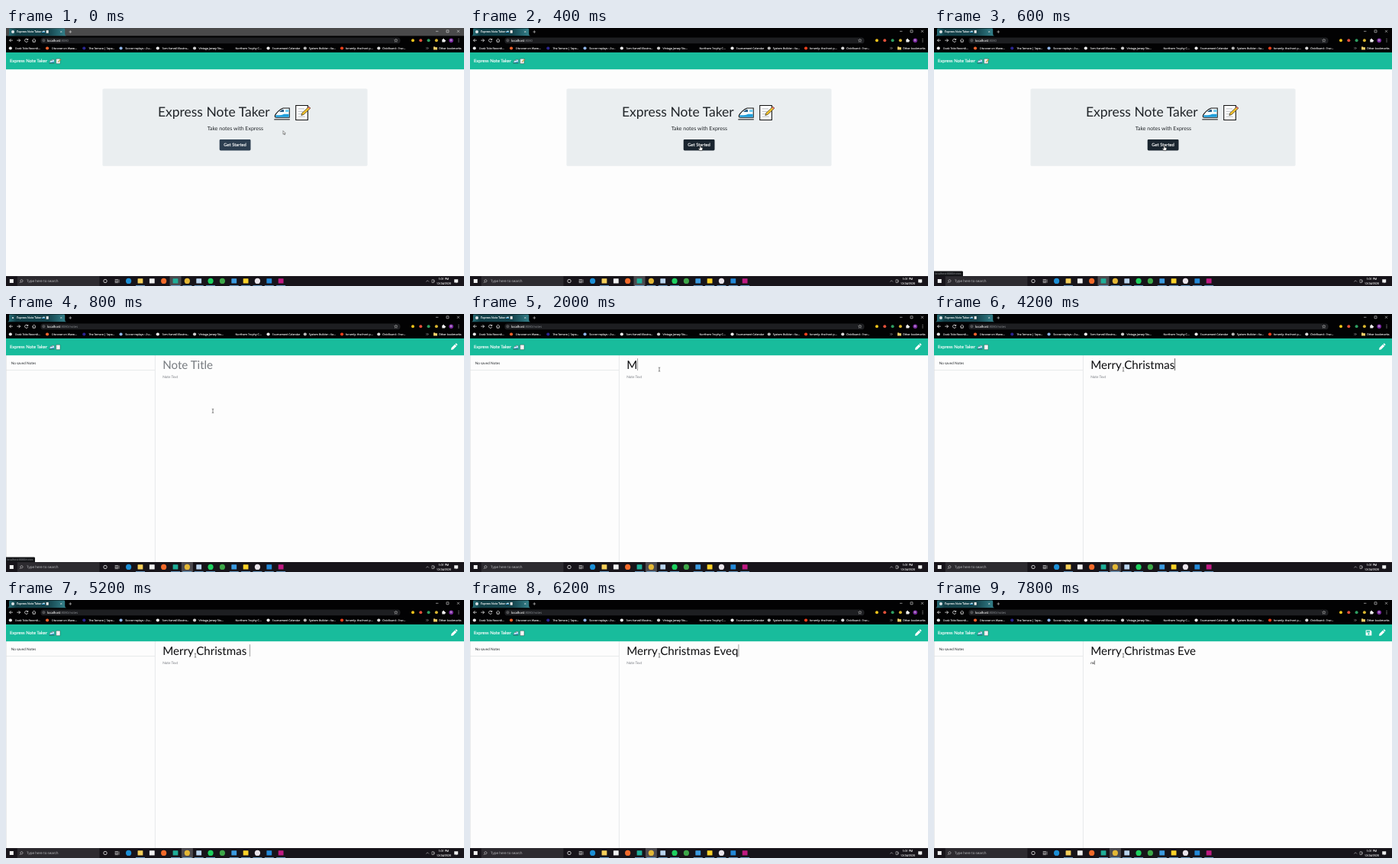
These frames come from a looping animation (600 by 338 pixels, 8000 ms). An HTML page:

```html
<!DOCTYPE html>
<html lang="en">
<head>
<meta charset="utf-8">
<title>Express Note Taker</title>
<style>
html, body { margin: 0; width: 100%; height: 100%; overflow: hidden; background: #fdfdfd; }
svg { display: block; width: 100vw; height: 100vh; }
text { font-family: Lato, sans-serif; white-space: pre; text-rendering: geometricPrecision; }
.ui text { font-family: "Open Sans", sans-serif; stroke: #fff; stroke-width: .1; }
.ui .dim { stroke: none; }
.light { fill: #fff; stroke: #fff; stroke-width: .14; }
</style>
</head>
<body>
<svg id="stage" viewBox="0 0 600 338" xmlns="http://www.w3.org/2000/svg">
  <defs>
    <linearGradient id="glow">
      <stop offset="0" stop-color="#2a7680"/>
      <stop offset=".15" stop-color="#123f47"/>
      <stop offset=".7" stop-color="#15454e"/>
      <stop offset="1" stop-color="#35838d"/>
    </linearGradient>
    <symbol id="train" viewBox="0 0 22 20" overflow="visible">
      <path d="M1 13.5C2.5 10 8 4.5 12.5 3.2H21V16H3Q.6 16 1 13.5Z" fill="#f6fbfd" stroke="#111" stroke-width="1.1"/>
      <path d="M1.6 12.8Q10 13.2 13.5 11.2H20.4V15.4H3Q1.4 15.3 1.6 12.8Z" fill="#1f9fdb"/>
      <path d="M7 8.4L10.8 5.2H13.4V8.4Z" fill="#2a5f86"/>
      <path d="M15.6 5.4H20.4V8.4H15.6Z" fill="#6cccf0"/>
      <path d="M0 18.8H21.6" stroke="#111" stroke-width="1.1"/>
    </symbol>
    <symbol id="page" viewBox="0 0 22 22" overflow="visible">
      <path d="M1.5 1.5H17.5V21H1.5Z" fill="#fff" stroke="#111" stroke-width="1.1"/>
      <path d="M4.5 6H13M4.5 9.5H11M4.5 13H9M4.5 16.5H14" stroke="#a4a9ad" stroke-width=".8"/>
    </symbol>
    <symbol id="memo" viewBox="0 0 22 22" overflow="visible">
      <use href="#page" width="22" height="22"/>
      <path d="M8.8 14.8L9.9 11.6L19 3L21.2 5.1L12 13.7Z" fill="#f7c52b" stroke="#222" stroke-width=".7"/>
      <path d="M17.6 4.3L19 3L21.2 5.1L19.8 6.4Z" fill="#e8736e"/>
    </symbol>
  </defs>

  <rect width="600" height="338" fill="#fdfdfd"/>

  <g id="home">
    <rect x="126.5" y="79.5" width="347" height="101.3" rx="1.6" fill="#eaeef0"/>
    <text x="198.9" y="116.4" font-size="17.5" fill="#212529">Express Note Taker</text>
    <use href="#train" x="351" y="102" width="21.5" height="19"/>
    <use href="#memo" x="378" y="100" width="22" height="21.5"/>
    <text x="300.3" y="134.4" font-size="7" fill="#212529" text-anchor="middle">Take notes with Express</text>
    <rect id="button" x="279.7" y="146" width="40.8" height="14.4" rx="1.4"/>
    <text class="light" x="300.1" y="155.4" font-size="5.86" text-anchor="middle">Get Started</text>
  </g>

  <g id="notes">
    <path d="M.4 54V325M195.4 54V325M0 73.6H195" fill="none" stroke="#dfe1e3" stroke-width=".7"/>
    <text x="6.7" y="65.9" font-size="4.69" fill="#212529">No saved Notes</text>
    <text id="title" x="205.2" y="71.8" font-size="15.1"/>
    <text id="body" x="205.2" y="83.7" font-size="4.69"/>
    <rect id="caret" width=".7"/>
  </g>

  <rect y="32" width="600" height="22.2" fill="#18bc9c"/>
  <text class="light" x="4.9" y="45.1" font-size="5.86">Express Note Taker</text>
  <use href="#train" x="56.6" y="40.3" width="7" height="6.4"/>
  <use id="navMemo" x="65.2" y="39.8" width="7.2" height="7.2"/>
  <g id="tools" fill="#fff">
    <path d="M583 46.9L583.5 44.2L588 39.7L590.2 41.9L585.7 46.4ZM588.5 39.2L589.2 38.6Q589.8 38.3 590.3 38.8L591.1 39.6Q591.6 40.1 591.2 40.7L590.7 41.4Z"/>
    <path id="save" fill-rule="evenodd" d="M566 39.4H571.8L573.3 40.9V46.4H566Q565.6 46.4 565.6 46V39.8Q565.6 39.4 566 39.4ZM566.6 40.4V42.4H571V40.4ZM569.4 43.3A1.1 1.1 0 1 0 569.41 43.3Z"/>
  </g>

  <g id="chrome" class="ui">
    <rect width="600" height="32" fill="#020203"/>
    <rect id="strip" width="600" height="10.3" fill="#4a4a4b"/>
    <path d="M2 10.3Q4 10 4 8V2Q4 .6 5.4 .6H75.6Q77.2 .6 77.2 2V8Q77.2 10 79 10.3Z" fill="url(#glow)"/>
    <circle id="favicon" cx="9" cy="5" r="2" fill="#dde3e6"/>
    <text x="14" y="6.4" font-size="3.65" fill="#f6f6f6">Express Note Taker</text>
    <use href="#train" x="46.6" y="2.8" width="4.4" height="4"/>
    <use href="#page" x="52.3" y="2.6" width="4.4" height="4.4"/>
    <path d="M71.2 3.8L73.4 6M73.4 3.8L71.2 6M82.5 5H86.1M84.3 3.2V6.8M563 4.3H566.4M577 2.8H580V5.8H577ZM591 2.8L594 5.8M594 2.8L591 5.8" fill="none" stroke="#ddd" stroke-width=".6"/>
    <path d="M8.8 16.2H4.6M6.5 14.2L4.5 16.2L6.5 18.2M14.4 16.2H18.6M16.7 14.2L18.7 16.2L16.7 18.2M28.5 15.2A2.1 2.1 0 1 0 28.7 17M28.8 13.9V15.5H27.2M34.3 16.4L36.7 14.2L39.1 16.4M35.2 16V18.3H38.2V16" fill="none" stroke="#f4f4f4" stroke-width=".75"/>
    <rect x="45.4" y="12.4" width="471.2" height="7.9" rx="3.9" fill="#1d1e21"/>
    <circle cx="49.4" cy="16.3" r="1.5" fill="none" stroke="#bbb" stroke-width=".45"/>
    <path d="M49.4 16V17.1M49.4 15.3V15.6" stroke="#bbb" stroke-width=".4"/>
    <text x="54" y="17.8" font-size="4.15" fill="#f0f0f0">localhost<tspan id="path" class="dim" fill="#8d9196"/></text>
    <path d="M510.8 14.1L511.4 15.6L513 15.7L511.8 16.8L512.2 18.4L510.8 17.5L509.4 18.4L509.8 16.8L508.6 15.7L510.2 15.6Z" fill="none" stroke="#ccc" stroke-width=".45"/>
    <path d="M571.3 15H572.4A.8 .8 0 1 1 573.8 15H575V16.1A.8 .8 0 1 1 575 17.4V18.6H571.3Z" fill="#eee"/>
    <circle cx="583.2" cy="16.2" r="2.8" fill="#7b2aa0"/>
    <text x="583.2" y="17.4" font-size="3.2" fill="#fff" text-anchor="middle">K</text>
    <g fill="#ddd"><circle cx="593" cy="14.3" r=".5"/><circle cx="593" cy="16.2" r=".5"/><circle cx="593" cy="18.1" r=".5"/></g>
    <path d="M550.5 25.2L551.7 26.5L550.5 27.8M552.2 25.2L553.4 26.5L552.2 27.8" fill="none" stroke="#ddd" stroke-width=".5"/>
    <path d="M560 24.6H562L562.6 25.3H565V28.6H560Z" fill="#f4cf6a"/>
    <text x="567" y="27.9" font-size="3.6" fill="#f2f2f2">Other bookmarks</text>
  </g>

  <g id="status" class="ui">
    <path d="M0 318.4H36.6Q38 318.4 38 319.8V325H0Z" fill="#141518"/>
    <text class="dim" x="1.4" y="323.2" font-size="3.5" fill="#9a9da1">localhost:8080/notes</text>
  </g>

  <g id="taskbar" class="ui">
    <rect y="325" width="600" height="13" fill="#17141a"/>
    <path d="M4.8 329H9.8V334H4.8Z" fill="#f2f2f2"/>
    <rect x="14.8" y="325.2" width="107.6" height="12.8" fill="#2d2b30"/>
    <path d="M21.6 330.2A1.6 1.6 0 1 0 21.6 332.4A1.6 1.6 0 0 0 21.6 330.2M19.3 332.6L17.9 334" fill="none" stroke="#ddd" stroke-width=".6"/>
    <text class="dim" x="27" y="333.2" font-size="4.55" fill="#c6c7c9">Type here to search</text>
    <circle cx="130" cy="331.5" r="2.2" fill="none" stroke="#eee" stroke-width=".8"/>
    <path d="M142.6 329.5H147M142.6 333.7H147M143 330.8H146.4V332.5H143ZM148 329.4V333.8" fill="none" stroke="#ddd" stroke-width=".6"/>
    <rect id="active" y="325.2" width="15" height="12.8" fill="#4c4a4f"/>
    <path d="M550.4 332.5L552.2 330.7L554 332.5M558 329.7H560.4V333.6H558ZM561.2 330.2V333" fill="none" stroke="#ddd" stroke-width=".55"/>
    <text x="573.3" y="330.4" font-size="3.7" fill="#f0f0f0" text-anchor="middle">1:01 PM</text>
    <text x="573.5" y="336.4" font-size="3.6" fill="#f0f0f0" text-anchor="middle">12/24/2020</text>
    <path d="M587.2 329.2H592.2V333.4H590.8L589.7 334.6V333.4H587.2Z" fill="#eee"/>
  </g>

  <g id="pointer">
    <path id="arrow" d="M0 0V4.7L1.1 3.7L1.9 5.4L2.6 5.1L1.9 3.4H3.3Z" fill="#fff" stroke="#222" stroke-width=".45"/>
    <path id="hand" d="M-.6 .4Q0 -.4 .6 .4V2.6L2.7 3.1Q3.3 3.4 3.2 4.2L2.6 7H-.8L-2.5 4.5Q-2.4 3.6 -1.5 4L-.6 4.8Z" fill="#fff" stroke="#111" stroke-width=".5"/>
    <path id="beam" d="M-1.2 -2.6Q0 -2.6 0 -2V2Q0 2.6 -1.2 2.6M1.2 -2.6Q0 -2.6 0 -2M0 2Q0 2.6 1.2 2.6" fill="none" stroke="#333" stroke-width=".6"/>
  </g>
</svg>

<script>
const NS = "http://www.w3.org/2000/svg";
const LOOP = 8000, STEP = 200;
const $ = id => document.getElementById(id);

function add(parent, tag, attrs, label) {
  const el = document.createElementNS(NS, tag);
  for (const k in attrs) el.setAttribute(k, attrs[k]);
  if (label) el.textContent = label;
  return parent.appendChild(el);
}
const dot = (parent, cx, cy, r, fill) => add(parent, "circle", { cx, cy, r, fill });
const show = (id, on) => $(id).setAttribute("display", on ? "inline" : "none");
const place = (id, attrs) => { for (const k in attrs) $(id).setAttribute(k, attrs[k]); };

const bookmarks = [
  ["Dusk Tide Recordi...", "#e8e8e8"],
  ["Discover on Wave...", "#f0622c"],
  ["The Terrace | Tape...", "#2b2591"],
  ["Soccer replays - Zu...", "#8fb4e8"],
  ["Tom Harvell Illustra...", "#f4f4f4"],
  ["Vintage Jersey Sto...", "#cfcfcf"],
  ["Northern Trophy C...", ""],
  ["Tournament Calendar", "#f2f2f2"],
  ["System Builder - Ka...", "#b8b8b8"],
  ["forumly: the front p...", "#f0401c"],
  ["CivicBoard - Trac...", "#d8d8d8"]
];
bookmarks.forEach(([label, color], i) => {
  const x = 12 + i * 48.1;
  if (color) dot($("chrome"), x - 6.2 + i * .15, 26.5, 2.1, color);
  add($("chrome"), "text", { x, y: 27.9, "font-size": 3.6, fill: "#f2f2f2" }, label);
});

["#f3c41b", "#e0503a", "#2f9e62", "#d9b530"].forEach((c, i) =>
  dot($("chrome"), 533 + i * 10.3, 16.2, 2, c));

// Taskbar: colour, shape (o round, s square), running mark
const apps = "#1c8fd6 o,#f6cf5a s1,#f1f1f1 s,#f26a2a o,#1fae98 s1,#e3b735 o1,#b9d4ee s1,#1ed05f o1,#3da648 o,#3c9be0 s1,#fbd229 s1,#e9e4ea o1,#2489d8 s1,#c01a82 s1";
apps.split(",").forEach((app, i) => {
  const [fill, kind] = app.split(" "), x = 160.6 + i * 15.35;
  if (kind[0] === "o") dot($("taskbar"), x, 331.4, 3.6, fill);
  else add($("taskbar"), "rect", { x: x - 3.4, y: 328.2, width: 6.8, height: 6.4, rx: .5, fill });
  if (kind[1]) add($("taskbar"), "rect", { x: x - 6, y: 337.2, width: 12, height: .8, fill: "#78b4e4" });
});

// Typed text: [time, characters shown]
const TITLE = "Merry Christmas Eveq", BODY = "mi";
const titleKeys = [
  [2000, 1], [2200, 2], [2400, 4], [2600, 5], [2800, 6], [3000, 7],
  [3200, 8], [3400, 9], [3600, 11], [3800, 12], [4000, 14], [4200, 15],
  [5000, 16], [5400, 17], [5600, 18], [5800, 19], [6200, 20], [6600, 19]
];
const bodyKeys = [[7600, 1], [7800, 2]];
const typed = (str, keys, t) => str.slice(0, keys.reduce((n, [at, len]) => t >= at ? len : n, 0));

function field(id, value, hint) {
  $(id).textContent = value || hint;
  $(id).setAttribute("fill", value ? "#0c0c0e" : "#777b80");
  return value ? $(id).getComputedTextLength() : 0;
}

function pointer(t) {
  const mix = (a, b, p) => a + (b - a) * p;
  if (t < 800) {
    const p = Math.min(1, t / 400);
    return [mix(363, 301.6, p), mix(134.6, 153.6, p)];
  }
  const p = 1 - (1 - Math.min(1, (t - 800) / 600)) ** 3;
  return [mix(271, 248, p), mix(127, 72.6, p)];
}

function draw(ms) {
  const t = Math.floor(ms / STEP) * STEP;
  const onNotes = t >= 800, hover = !onNotes && t >= 400;

  show("home", !onNotes);
  show("notes", onNotes);
  show("tools", onNotes);
  show("save", t >= 7600);
  show("status", t >= 600 && t < 1400);
  show("strip", t < 200);
  place("button", { fill: hover ? "#1a252f" : "#2c3e50" });
  place("navMemo", { href: onNotes ? "#page" : "#memo" });
  place("favicon", { r: t === 800 ? 1.1 : 2 });
  place("active", { x: onNotes ? 229.9 : 214.5 });
  $("path").textContent = onNotes ? ":8080/notes" : ":8080";

  const [x, y] = pointer(t);
  place("pointer", { transform: `translate(${x} ${y})` });
  show("arrow", !onNotes && !hover);
  show("hand", hover);
  show("beam", onNotes);

  if (!onNotes) return;
  const titleLen = field("title", typed(TITLE, titleKeys, t), "Note Title");
  const bodyLen = field("body", typed(BODY, bodyKeys, t), "Note Text");
  const inBody = t >= 6800;
  const blink = (t >= 4600 && t < 5000) || (t >= 7200 && t < 7600);
  show("caret", t >= 2000 && !blink);
  place("caret", inBody
    ? { x: 205.3 + bodyLen, y: 79.2, height: 5.6, width: .5, fill: "#333" }
    : { x: 205.3 + titleLen, y: 58.2, height: 15.8, width: .7, fill: t === 4200 ? "#222" : "#777" });
}

function tick(now) {
  draw(now % LOOP);
  requestAnimationFrame(tick);
}
draw(0);
requestAnimationFrame(tick);
</script>
</body>
</html>
```
